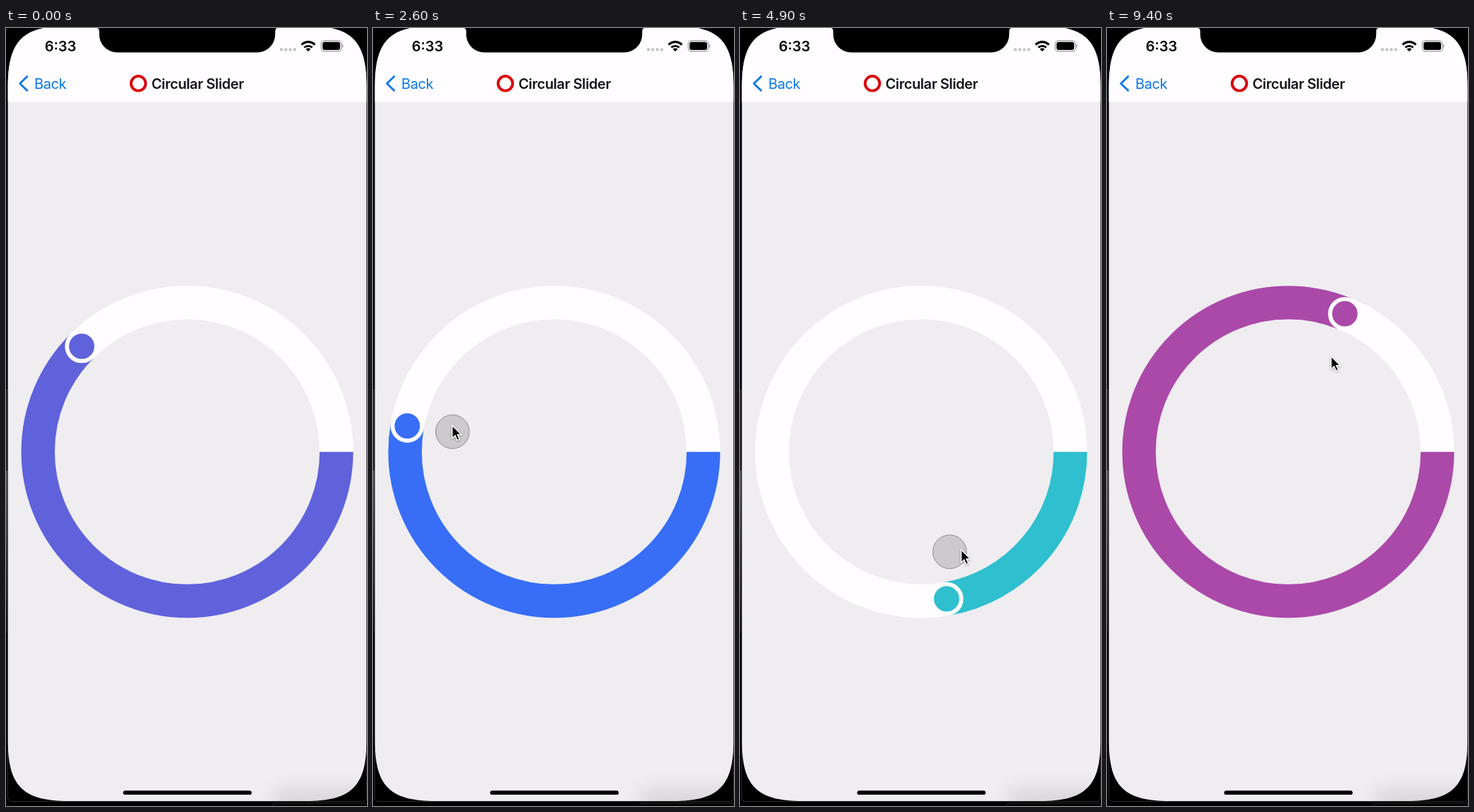
An HTML page that plays this animation: 510x1099 px, repeating every 9.5 s.

```html
<!DOCTYPE html>
<html lang="en">
<head>
<meta charset="utf-8">
<title>Circular Slider</title>
<style>
html, body { margin: 0; width: 100%; height: 100%; overflow: hidden; background: #000; }
svg { display: block; width: 100%; height: 100%; }
text { font-family: Inter, Roboto, sans-serif; font-size: 20px; }
#arrow { filter: drop-shadow(0 1.5px 1.5px rgba(0, 0, 0, .35)); }
</style>
</head>
<body>
<svg viewBox="0 0 510 1099">
  <defs>
    <clipPath id="screen">
      <path d="M2.7 82C2.7 18 24 -3 88 -3H424C488 -3 509.3 18 509.3 82V1007C509.3 1071 488 1092 424 1092H88C24 1092 2.7 1071 2.7 1007Z"/>
    </clipPath>
    <filter id="soft" x="-50%" y="-100%" width="200%" height="300%"><feGaussianBlur stdDeviation="13"/></filter>
    <linearGradient id="edge" x2="0" y2="1">
      <stop stop-color="#555"/><stop offset="1" stop-color="#111"/>
    </linearGradient>
  </defs>

  <!-- desktop behind the device -->
  <rect width="2" height="510" fill="#04040f"/>
  <rect y="510" width="2" height="115" fill="#222"/>
  <rect y="625" width="2" height="230" fill="url(#edge)"/>
  <path d="M2.5 1020V1086Q2.5 1092.5 9 1092.5H503Q509.5 1092.5 509.5 1086V1020M377 1099Q377 1095 382 1095H510" fill="none" stroke="#2c2c2e"/>

  <g clip-path="url(#screen)">
    <rect width="510" height="1099" fill="#efedf0"/>
    <rect width="510" height="104.5" fill="#fffdff"/>
    <rect x="380" y="1074" width="160" height="50" opacity=".09" filter="url(#soft)"/>
  </g>
  <path d="M128 0Q131.7 0 131.7 5V9A25.5 25.5 0 0 0 157 34.5H355A25.5 25.5 0 0 0 380.3 9V5Q380.3 0 384 0Z"/>

  <!-- status bar -->
  <text x="77" y="33" text-anchor="middle" font-weight="600">6:33</text>
  <path d="M389 30.5h19" stroke="#c5c3c6" stroke-width="4.4" stroke-linecap="round" stroke-dasharray="0 6.3"/>
  <g fill="none" stroke="#000">
    <path d="M417.6 23.6A13 13 0 0 1 436.4 23.6" stroke-width="3.1"/>
    <path d="M421.4 27.6A8 8 0 0 1 432.6 27.6" stroke-width="2.8"/>
  </g>
  <path d="M427 33.2L423.6 29.8A4.8 4.8 0 0 1 430.4 29.8Z"/>
  <rect x="445.3" y="17.8" width="28.6" height="15" rx="4.6" fill="none" stroke="#98969a" stroke-width="1.2"/>
  <rect x="447.2" y="19.7" width="24.8" height="11.2" rx="3"/>
  <path d="M475.3 23Q477.2 25.3 475.3 27.6Z" fill="#98969a" stroke="#98969a" stroke-width=".6"/>

  <!-- navigation bar -->
  <path d="M29.8 68.6L19.6 78.4L29.8 88.2" fill="none" stroke="#0b77e8" stroke-width="2.8" stroke-linecap="round" stroke-linejoin="round"/>
  <text x="40" y="85.5" fill="#0b77e8" letter-spacing="-.4">Back</text>
  <circle cx="187" cy="78.3" r="10.3" fill="none" stroke="#d9070f" stroke-width="3.9"/>
  <text x="205.5" y="85.5" fill="#151417" font-weight="600" letter-spacing="-.42">Circular Slider</text>

  <!-- slider -->
  <g fill="none" stroke-width="47.4">
    <circle cx="256" cy="598.7" r="210.8" stroke="#fffdff"/>
    <circle id="arc" cx="256" cy="598.7" r="210.8" pathLength="360"/>
  </g>
  <circle id="thumb" r="20.8" stroke="#fffdff" stroke-width="5.8"/>

  <rect x="165.5" y="1077.3" width="181.5" height="5.8" rx="2.9"/>

  <circle id="touch" r="23.8" fill="rgba(196,194,197,.8)" stroke="#8d8b8f"/>
  <path id="arrow" d="M0 0V18L4.2 14.2L7 20.8L10.2 19.4L7.4 13H13Z" stroke="#fff" stroke-width="1.4"/>
</svg>
<script>
const LOOP = 9500, STEP = 100, CX = 256, CY = 598.7, RADIUS = 210.8;
const PRESS = 1000, RELEASE = 9400;
const TOUCH_LEAD = 40, CURSOR_LEAD = 80;   // the thumb trails the touch, the touch trails the cursor

// the drag: time in ms, angle in degrees clockwise from the right, finger distance from the centre
const drag = [
  [1000, 225, 140], [1800, 323.1, 134], [1960, 331, 135], [2600, 190, 145], [3400, 350, 219],
  [3600, 335.6, 184], [4900, 80.2, 146], [5560, 1, 228], [5880, 1, 228], [6800, 23, 197],
  [7600, 197.4, 120], [9400, 292.3, 148], [9500, 294.3, 148]
];
const stops = [[49, 252, 170], [45, 114, 254], [247, 49, 118]];

const $ = id => document.getElementById(id);
const arc = $('arc'), thumb = $('thumb'), touch = $('touch'), arrow = $('arrow');

const mix = (a, b, u) => a + (b - a) * u;
const rise = (i, k) => (drag[i + 1][k] - drag[i][k]) / (drag[i + 1][0] - drag[i][0]);

function slope(i, k) {
  if (i === 0 || i === drag.length - 1) return 0;
  const a = rise(i - 1, k), b = rise(i, k);
  return a * b > 0 ? 2 * a * b / (a + b) : 0;
}

// monotone cubic through the drag points
function sample(t, k) {
  if (t <= PRESS) return drag[0][k];
  const i = drag.findIndex(p => p[0] > t) - 1;
  const a = drag[i], b = drag[i + 1], h = b[0] - a[0], u = (t - a[0]) / h, v = 1 - u;
  return mix(a[k], b[k], u * u * (3 - 2 * u))
    + h * u * v * (v * slope(i, k) - u * slope(i + 1, k));
}

function polar(deg, r) {
  const a = deg * Math.PI / 180;
  return [CX + r * Math.cos(a), CY + r * Math.sin(a)];
}

const finger = t => polar(sample(t, 1), sample(t, 2));

function colour(p) {
  const i = p < .5 ? 0 : 1;
  return `rgb(${stops[i].map((c, n) => Math.round(mix(c, stops[i + 1][n], p * 2 - i)))})`;
}

function place(el, [x, y], shown = true) {
  el.setAttribute('transform', `translate(${x.toFixed(2)} ${y.toFixed(2)})`);
  el.style.display = shown ? '' : 'none';
}

function cursor(t) {
  if (t >= PRESS) return finger(t + CURSOR_LEAD);
  const u = Math.min(1, Math.max(0, (t - 100) / 800)), e = u * u * (3 - 2 * u);
  const [x, y] = finger(PRESS);
  return [mix(461, x, e), mix(798, y, e)];
}

function draw(now) {
  const t = Math.floor(now % LOOP / STEP) * STEP;
  const angle = sample(t, 1), tint = colour(angle / 360);
  arc.setAttribute('stroke', tint);
  arc.setAttribute('stroke-dasharray', `${angle} 360`);
  thumb.setAttribute('fill', tint);
  place(thumb, polar(angle, RADIUS));
  place(touch, finger(t + TOUCH_LEAD), t >= PRESS && t < RELEASE);
  place(arrow, cursor(t), t > 0);
}

let start;
function tick(now) {
  start ??= now;
  draw(now - start);
  requestAnimationFrame(tick);
}
draw(0);
requestAnimationFrame(tick);
</script>
</body>
</html>
```
